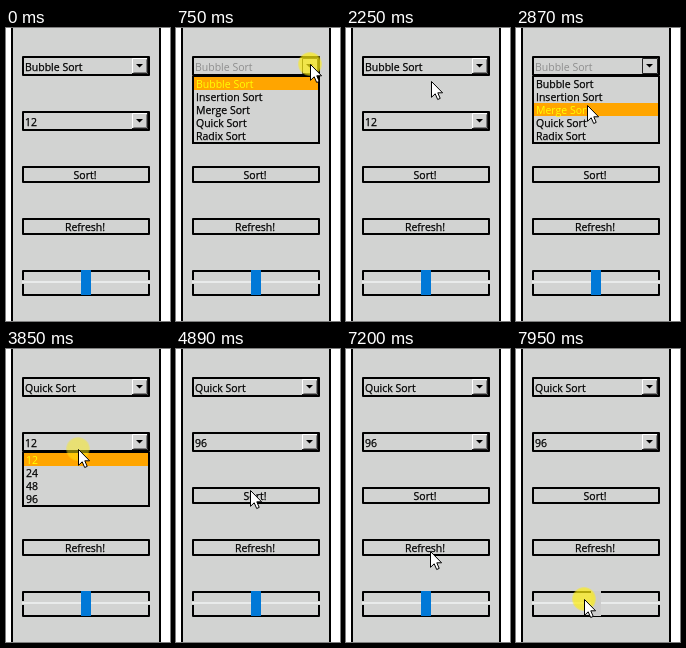
Write an HTML page that moves like this. It is 164x293 px and loops after 8000 ms.

```html
<!DOCTYPE html>
<html lang="en">
<head>
<meta charset="utf-8">
<title>Sort controls</title>
<style>
  html, body { margin: 0; width: 100%; height: 100%; overflow: hidden; background: #fff; }
  svg { display: block; width: 100vw; height: 100vh; }
  rect { shape-rendering: crispEdges; }
  text { font: 10.5px "Open Sans", "Noto Sans", sans-serif; fill: #000; stroke: #000; stroke-width: .25; }
  .box { fill: none; stroke: #000; stroke-width: 2; stroke-linejoin: round; shape-rendering: auto; }
  .mid { text-anchor: middle; }
  .dim { fill: #8e8e8e; stroke: none; }
  .lit { fill: #ff0; stroke: none; }
  .panel { fill: #d2d3d2; }
  .off, .flat .relief, .outline { display: none; }
  .flat .outline { display: inline; }
</style>
</head>
<body>
<svg viewBox="0 0 164 293">
  <defs>
    <radialGradient id="glow">
      <stop offset=".85" stop-color="#ffee10" stop-opacity=".7"/>
      <stop offset="1" stop-color="#ffee10" stop-opacity=".35"/>
    </radialGradient>
    <g id="arrow">
      <rect class="panel" width="16" height="16"/>
      <path d="M4 6H11L7.5 9.5Z"/>
    </g>
    <g id="relief" fill="none">
      <path d="M.5 15V.5H15" stroke="#fff"/>
      <path d="M1.5 14.5H14.5V1.5" stroke="#808080"/>
      <path d="M0 15.5H15.5V0" stroke="#222"/>
    </g>
    <path id="outline" d="M.5 .5H15.5V15.5H.5Z" fill="none" stroke="#222"/>
  </defs>

  <rect x="5" width="150" height="293"/>
  <rect class="panel" x="7" width="146" height="293"/>

  <rect class="box" x="17" y="139" width="126" height="15"/>
  <text class="mid" x="79" y="151">Sort!</text>
  <rect class="box" x="17" y="191" width="126" height="15"/>
  <text class="mid" x="79" y="203">Refresh!</text>

  <rect class="box" x="17" y="243" width="126" height="24"/>
  <rect class="panel" x="16" y="252" width="128" height="4"/>
  <rect x="16" y="253" width="128" height="2" fill="#e9ebeb"/>
  <rect id="thumb" x="75" y="242" width="10" height="25"/>

  <g id="fields"></g>
  <g id="lists"></g>
  <circle id="click" r="12" fill="url(#glow)"/>
  <path id="cursor" d="M.5 .5V16.3L4.2 12.8L6.7 18.5L9.2 17.4L6.8 11.8H11.6Z" fill="#fff" stroke="#000"/>
</svg>
<script>
const LOOP = 8000, TICK = 47.04, LEAD = 11; // the picture advances in ticks
const ROW = 13, GLIDE = 8, PRESS = 2;
const $ = id => document.getElementById(id);

// Cursor stops: arrival tick, x, y
const stops = [
  [1, 155, 273], [4, 139, 68], [15, 134, 36], [26, 97, 54], [29, 96, 55],
  [48, 85, 53], [52, 72, 41], [64, 70, 99], [78, 72, 100], [91, 74, 145],
  [104, 74, 141], [111, 76, 149], [126, 86, 151], [135, 90, 174],
  [138, 84, 212], [147, 84, 202], [163, 82, 250], [169, 68, 250]
];

// Clicks alternate between opening the list and choosing from it
const combos = [
  { y: 28, pick: 3, clicks: [15, 36, 52, 71],
    items: ["Bubble Sort", "Insertion Sort", "Merge Sort", "Quick Sort", "Radix Sort"] },
  { y: 83, pick: 3, clicks: [82, 94], items: ["12", "24", "48", "96"] }
];
const refresh = 151, drag = 164;
const clicks = [...combos.flatMap(c => c.clicks), refresh];

function addGroup(parent, markup) {
  const g = document.createElementNS("http://www.w3.org/2000/svg", "g");
  g.innerHTML = markup;
  $(parent).append(g);
  return g;
}

for (const c of combos) {
  const h = c.items.length * ROW;
  c.top = c.y + 21;
  const field = addGroup("fields", `
    <rect class="box" x="17" y="${c.y + 1}" width="126" height="18"/>
    <text x="19" y="${c.y + 15}"></text>
    <g class="button" transform="translate(126 ${c.y + 2})">
      <use href="#arrow"/><use class="relief" href="#relief"/><use class="outline" href="#outline"/>
    </g>`);
  c.list = addGroup("lists", `
    <rect x="16" y="${c.top - 1}" width="128" height="${h + 3}"/>
    <rect class="panel" x="18" y="${c.top}" width="124" height="${h}"/>
    <rect class="bar" x="18" width="124" height="${ROW}" fill="#ffa500"/>
    ${c.items.map((s, i) => `<text x="20" y="${c.top + 11 + i * ROW}">${s}</text>`).join("")}`);
  c.value = field.querySelector("text");
  c.button = field.querySelector(".button");
  c.bar = c.list.querySelector(".bar");
  c.rows = [...c.list.querySelectorAll("text")];
}

// Each glide ends on its arrival tick
function cursorAt(n) {
  const i = stops.findIndex(s => s[0] > n);
  if (i < 1) return stops.at(i).slice(1);
  const [t0, ...from] = stops[i - 1], [t1, ...to] = stops[i];
  const span = Math.min(GLIDE, t1 - t0), k = Math.max(0, 1 - (t1 - n) / span);
  return from.map((v, j) => Math.round(v + (to[j] - v) * k));
}

function isOpen(c, n) {
  const done = c.clicks.filter((t, i) => n >= (i % 2 ? t + PRESS : t)).length;
  return done % 2 === 1;
}

function drawCombo(c, n, y) {
  const open = isOpen(c, n), settled = open && isOpen(c, n - 1);
  const hover = Math.max(0, Math.min(c.items.length - 1, Math.floor((y - c.top) / ROW)));
  c.value.textContent = c.items[n >= c.clicks.at(-1) + PRESS ? c.pick : 0];
  c.value.classList.toggle("dim", settled);
  c.button.classList.toggle("flat", settled);
  c.list.classList.toggle("off", !open);
  c.bar.setAttribute("y", c.top + hover * ROW);
  c.rows.forEach((r, i) => r.classList.toggle("lit", i === hover));
}

function draw(now) {
  const n = Math.floor((now % LOOP + LEAD) / TICK);
  const [x, y] = cursorAt(n), move = `translate(${x} ${y})`;
  const dragging = n >= drag;
  const press = dragging ? drag : clicks.find(t => n >= t && n < t + PRESS);
  $("cursor").setAttribute("transform", move);
  $("click").setAttribute("transform", move);
  $("cursor").classList.toggle("off", n < 1);
  $("click").classList.toggle("off", press === undefined);
  $("click").setAttribute("opacity", Math.min(1, .7 + .3 * (n - press)) || 0);
  $("thumb").setAttribute("fill", dragging ? "#ccc" : "#0078d7");
  combos.forEach(c => drawCombo(c, n, y));
}

const start = performance.now();
function loop() {
  draw(performance.now() - start);
  requestAnimationFrame(loop);
}
loop();
</script>
</body>
</html>
```
